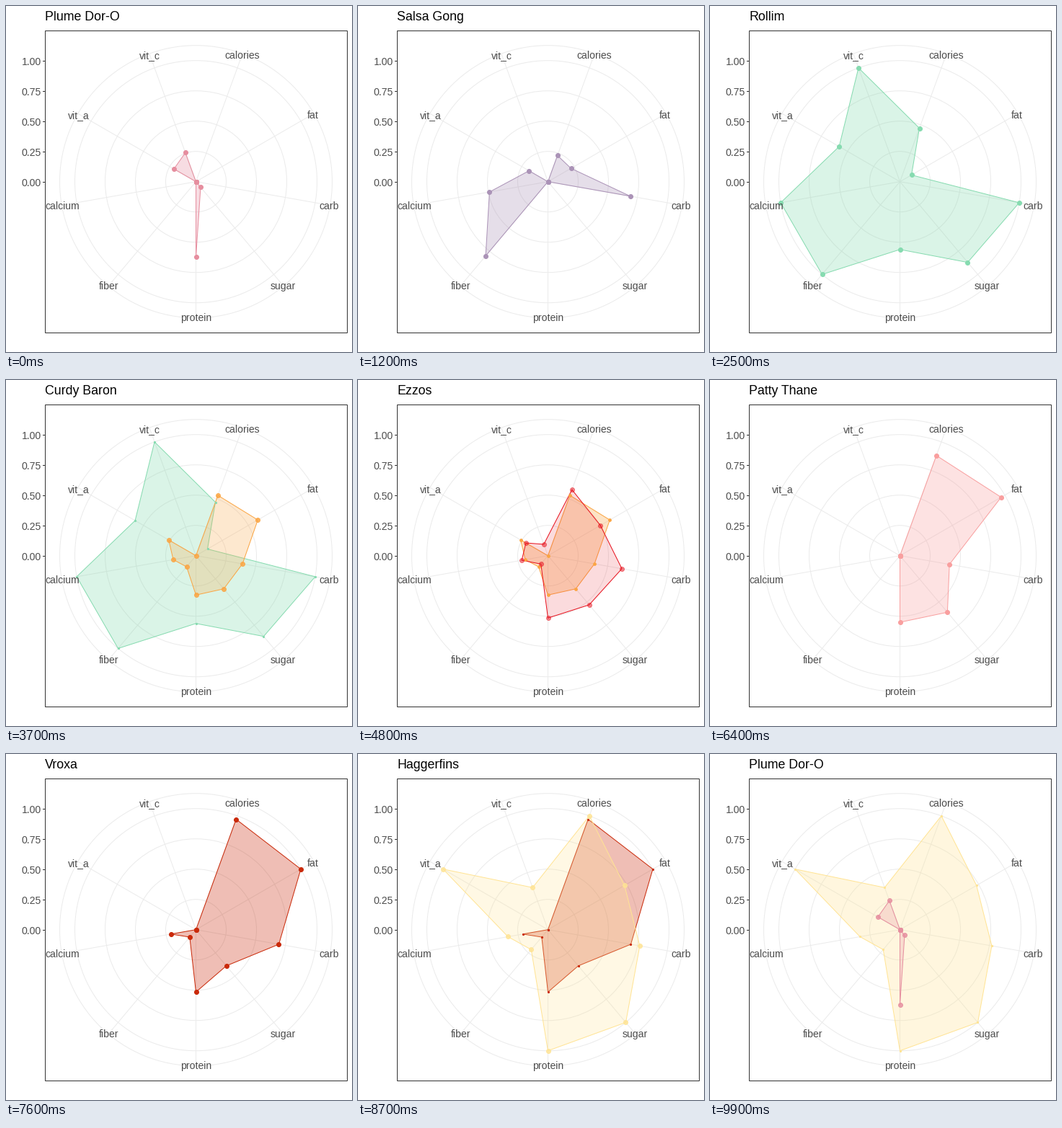
A matplotlib script that plays this animation: 480 by 480 pixels, repeating every 10000 ms.

```python
import numpy as np
import matplotlib.pyplot as plt
from matplotlib.animation import FuncAnimation
from matplotlib.colors import to_rgba
from matplotlib.patches import Circle, Polygon, Rectangle

plt.rcParams["font.family"] = "Liberation Sans"

PX = 0.75  # points per pixel at 96 dpi
CX, CY, UNIT = 263.5, 243.7, 168.0
RIM = 1.125
STEPS = 6
FRAMES = 100

AXES = ["calories", "fat", "carb", "sugar", "protein",
        "fiber", "calcium", "vit_a", "vit_c"]
ANGLES = np.radians(20 + 40 * np.arange(len(AXES)))


def polar(values):
    """Stage positions of radii measured along the nine axes."""
    r = np.asarray(values) * UNIT
    return np.column_stack([CX + r * np.sin(ANGLES), CY - r * np.cos(ANGLES)])


def profile(**key):
    """Corners from key values; a lone gap is bridged, wider gaps are zero."""
    values = []
    for k, axis in enumerate(AXES):
        before, after = AXES[k - 1], AXES[(k + 1) % len(AXES)]
        if axis in key:
            values.append(key[axis])
        elif before in key and after in key:
            values.append((key[before] + key[after]) / 2)
        else:
            values.append(0)
    return polar(values)


STATES = [
    ("Plume Dor-O", "#E68E9F",
     profile(sugar=.06, protein=.62, vit_a=.21, vit_c=.255)),
    ("Salsa Gong", "#AB93B7",
     profile(calories=.23, fat=.22, carb=.69, fiber=.8, vit_a=.18, vit_c=0)),
    ("Rollim", "#86DBB0",
     profile(calories=.47, fat=.11, carb=1, sugar=.87, protein=.56,
             fiber=1, calcium=1, vit_a=.58, vit_c=1)),
    ("Curdy Baron", "#FBA542",
     profile(calories=.53, fat=.59, carb=.39, protein=.325,
             fiber=.12, vit_a=.26, vit_c=0)),
    ("Ezzos", "#E8101C",
     profile(calories=.58, fat=.5, carb=.62, sugar=.53, protein=.515,
             fiber=.09, calcium=.22, vit_a=.21, vit_c=.1)),
    ("Patty Thane", "#F99F9F",
     profile(calories=.88, fat=.965, carb=.415, sugar=.61, protein=.55)),
    ("Vroxa", "#CA2A0A",
     profile(calories=.97, fat=1, sugar=.39, protein=.515,
             fiber=.08, calcium=.21)),
    ("Haggerfins", "#FFE494",
     profile(calories=1, fat=.73, carb=.77, sugar=1, protein=1,
             fiber=.215, calcium=.335, vit_a=1, vit_c=.37)),
]

# the first four holds last one frame longer than the rest
STARTS = [7 + 12 * k + min(k, 4) for k in range(len(STATES))]

fig = plt.figure(figsize=(5, 5), dpi=96, facecolor="white")
ax = fig.add_axes([0, 0, 1, 1])
ax.set_xlim(0, 480)
ax.set_ylim(480, 0)
ax.axis("off")


def line(xs, ys, color, z):
    ax.plot(xs, ys, color=color, lw=PX, snap=False, zorder=z,
            solid_capstyle="butt")


def label(x, y, text, size=14, color="#4D4D4D", ha="center"):
    return ax.text(x, y, text, fontsize=size * PX, color=color, ha=ha,
                   va="baseline", zorder=6)


# grid and axis names
for radius in (.25, .5, .75, 1, RIM):
    ax.add_patch(Circle((CX, CY), radius * UNIT, fill=False, ec="#EBEBEB",
                        lw=PX, zorder=1))
for name, (x, y) in zip(AXES, polar(np.full(len(AXES), RIM))):
    line([CX, x], [CY, y], "#EBEBEB", 1)
for name, (x, y) in zip(AXES, polar(np.full(len(AXES), RIM - .008))):
    label(x, y + 6, name)

# frame and scale
ax.add_patch(Rectangle((54.5, 34.5), 419, 419, fill=False, ec="#333333",
                       lw=PX, snap=False, zorder=7))
for k in range(5):
    y = 244.5 - 42 * k
    line([51, 54], [y, y], "#333333", 7)
    label(49, y + 5, f"{k / 4:.2f}", ha="right")

title = label(54.3, 20, "", 17.7, "black", "left")


class Radar:
    """One filled shape with its corner dots."""

    def __init__(self, z):
        self.area = Polygon(polar(np.zeros(len(AXES))), closed=True, lw=PX,
                            joinstyle="round", snap=False, zorder=z)
        ax.add_patch(self.area)
        self.dots, = ax.plot([], [], "o", ls="none", mew=PX, zorder=z + 2)

    def show(self, state, alpha=1.0, size=1.0):
        _, color, pts = state
        self.area.set_xy(pts)
        self.area.set_facecolor(to_rgba(color, 0.3 * alpha))
        self.area.set_edgecolor(color)
        self.dots.set_data(pts[:, 0], pts[:, 1])
        self.dots.set_markersize(2 * (0.7 + 2.3 * size) * PX)
        self.dots.set_markerfacecolor(to_rgba(color, alpha))
        self.dots.set_markeredgecolor(to_rgba(color, alpha))
        self.set_visible(True)

    def set_visible(self, on):
        self.area.set_visible(on)
        self.dots.set_visible(on)


leaving, entering = Radar(2), Radar(2.5)


def draw(i):
    done = sum(i >= s for s in STARTS)
    new = STATES[done % len(STATES)]
    old = STATES[done - 1]
    t = min(1.0, (i - STARTS[done - 1] + 1) / STEPS) if done else 1.0

    entering.show(new, alpha=t)
    if t < 1:
        leaving.show(old, size=1 - t)
    else:
        leaving.set_visible(False)
    title.set_text((new if t >= 0.5 else old)[0])
    return leaving.area, leaving.dots, entering.area, entering.dots, title


anim = FuncAnimation(fig, draw, frames=FRAMES, interval=100,
                     repeat=True, repeat_delay=0, blit=False)
plt.show()
```
